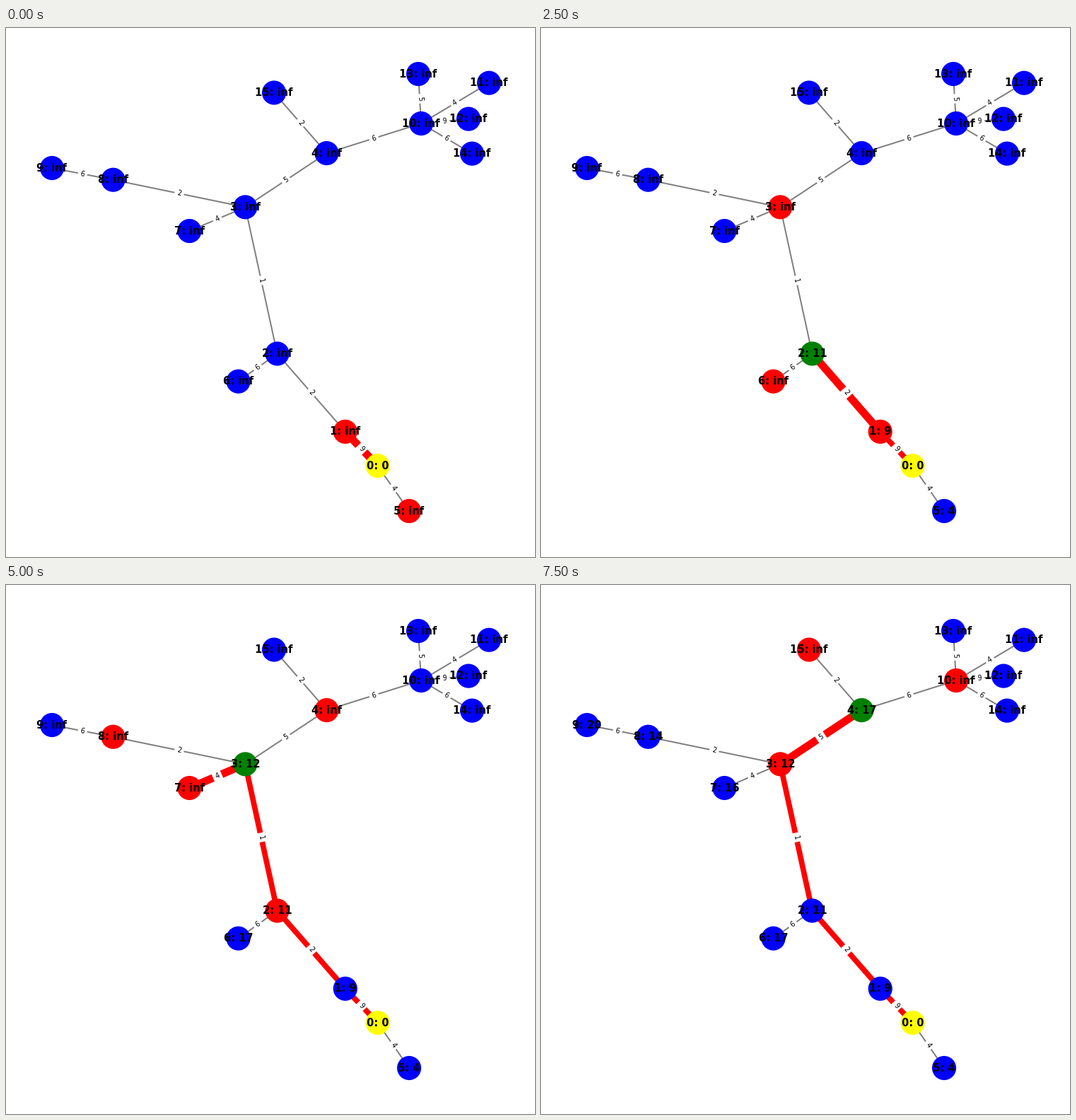
These frames come from a looping animation (748x748 px, 8 s). A matplotlib script:

```python
from itertools import islice
from math import atan2, degrees, inf

import matplotlib.pyplot as plt
from matplotlib.animation import FuncAnimation
from matplotlib.collections import LineCollection

SIZE, DPI = 748, 88
FRAMES, INTERVAL = 16, 500
SOURCE = 0
GRAY, RED = (0.5, 0.5, 0.5), (1, 0, 0)
THIN, PATH, ACTIVE = 1.65, 6.3, 9

# One row per node: parent, edge weight, x, y.
TREE = [
    (None, 0, 525.5, 619), (0, 9, 479.7, 570.8), (1, 2, 383.5, 460.5),
    (2, 1, 338.3, 253.3), (3, 5, 453.4, 177), (0, 4, 570, 683),
    (2, 6, 328.5, 499.7), (3, 4, 259.4, 287), (3, 2, 151.5, 214.7),
    (8, 6, 65, 198), (4, 6, 587, 135), (10, 4, 683, 77.7),
    (10, 9, 654, 128.6), (10, 5, 583, 65), (10, 6, 659, 177.6),
    (4, 2, 379, 91.5),
]
NODES = range(len(TREE))
POS = [row[2:] for row in TREE]
EDGES = {(row[0], n): row[1] for n, row in enumerate(TREE) if n != SOURCE}


def edge(u, v):
    return min(u, v), max(u, v)


def neighbors(u):
    return [v for v in NODES if edge(u, v) in EDGES]


def dijkstra():
    """Yield (node, distances, edge widths) for every visit and relaxation."""
    dist = {n: inf for n in NODES}
    dist[SOURCE] = 0
    prev, todo = {}, set(NODES)
    while todo:
        u = min(todo, key=lambda n: (dist[n], n))
        todo.remove(u)
        known = dict(dist)
        path, n = {}, u
        while n in prev:
            path[edge(n, prev[n])] = PATH
            n = prev[n]
        if u != SOURCE:
            yield u, known, {**path, edge(u, prev[u]): ACTIVE}
        for v in neighbors(u):
            if v in todo:
                yield u, known, {**path, edge(u, v): ACTIVE}
                d = dist[u] + EDGES[edge(u, v)]
                if d < dist[v]:
                    dist[v], prev[v] = d, u


def node_color(n, current):
    if n == SOURCE:
        return "yellow"
    if n == current:
        return "green"
    return "red" if n in neighbors(current) else "blue"


STEPS = list(islice(dijkstra(), FRAMES))

plt.rcParams["font.family"] = "DejaVu Sans"
fig = plt.figure(figsize=(SIZE / DPI, SIZE / DPI), dpi=DPI, facecolor="white")
ax = fig.add_axes([0, 0, 1, 1])
ax.set(xlim=(0, SIZE), ylim=(SIZE, 0))
ax.axis("off")

lines = LineCollection([(POS[a], POS[b]) for a, b in EDGES], zorder=1)
ax.add_collection(lines)
for (a, b), weight in EDGES.items():
    (x1, y1), (x2, y2) = sorted((POS[a], POS[b]))
    ax.text((x1 + x2) / 2, (y1 + y2) / 2, weight, size=8,
            ha="center", va="center", zorder=1.5,
            rotation=degrees(atan2(y1 - y2, x2 - x1)),
            bbox=dict(boxstyle="round", fc="white", ec="white"))

nodes = ax.scatter(*zip(*POS), s=700, linewidths=1.5, zorder=2)
names = [ax.text(x, y, "", size=12, weight="bold", ha="center", va="center",
                 zorder=3) for x, y in POS]


def update(i):
    current, known, widths = STEPS[i]
    lines.set_linewidths([widths.get(e, THIN) for e in EDGES])
    lines.set_colors([RED if e in widths else GRAY for e in EDGES])
    colors = [node_color(n, current) for n in NODES]
    nodes.set_facecolor(colors)
    nodes.set_edgecolor(colors)
    for n, name in enumerate(names):
        name.set_text(f"{n}: {known[n]}")
    return [lines, nodes, *names]


anim = FuncAnimation(fig, update, frames=FRAMES, interval=INTERVAL,
                     repeat=True, repeat_delay=0, blit=False)
plt.show()
```
